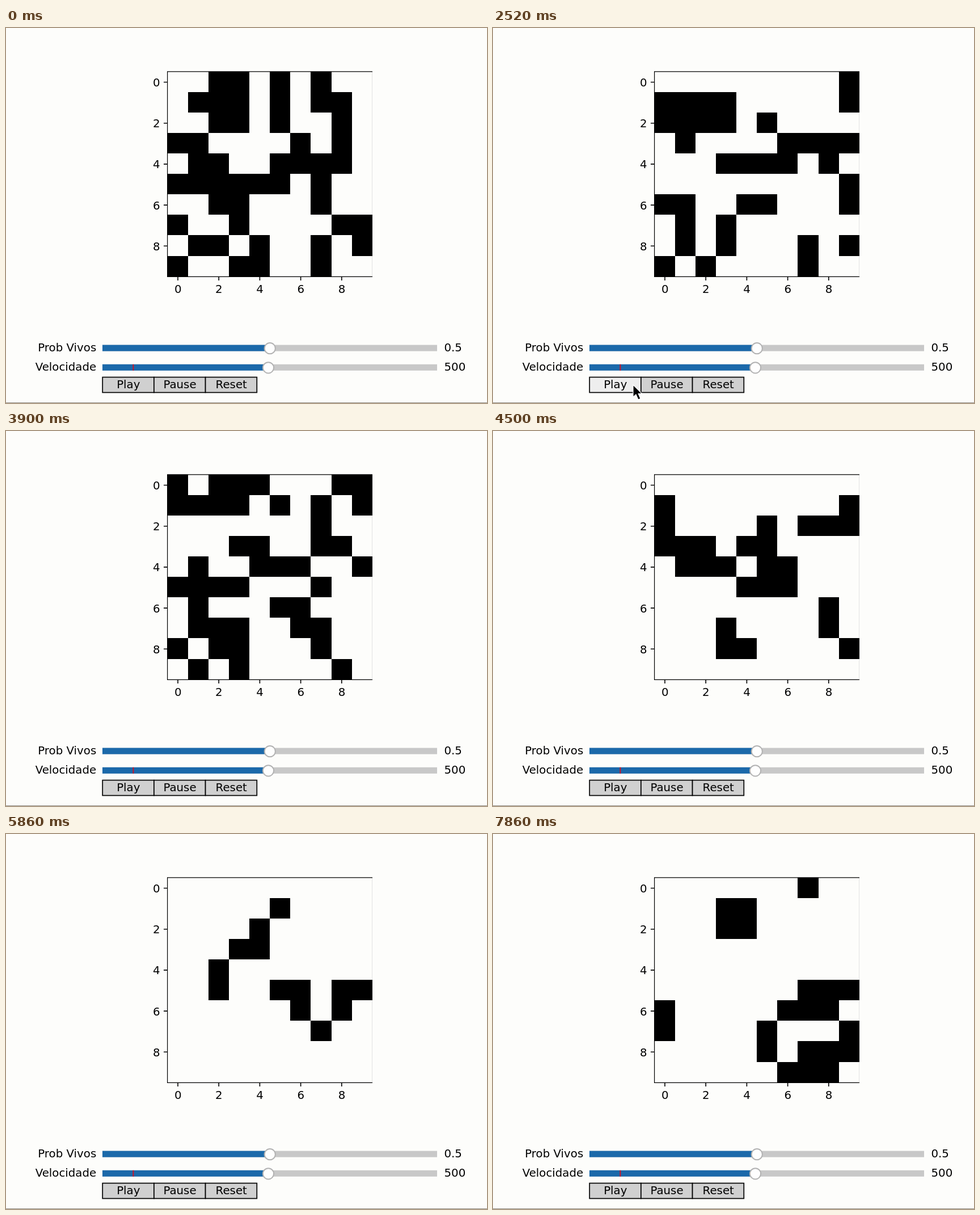
Animation of 848 by 661 pixels, one loop 8000 ms. Source, as an HTML page:

```html
<!DOCTYPE html>
<html lang="pt">
<head>
<meta charset="utf-8">
<title>Jogo da Vida</title>
<style>
  html, body { margin: 0; width: 100%; height: 100%; overflow: hidden; background: #fdfdfb; }
  svg { display: block; width: 848px; height: 661px; }
  text { font: 19.8px "DejaVu Sans", sans-serif; fill: #000; }
  .end { text-anchor: end; }
  .mid { text-anchor: middle; }
  .track { fill: #c8c8c8; }
  .fill { fill: #1b69aa; }
  .handle { fill: #fefefe; stroke: #b2b2b2; stroke-width: 2; }
  .button { fill: #d0d0d0; stroke: #000; stroke-width: 1.7; }
  .button.hover { fill: #eeeeee; }
  .ticks { stroke: #000; stroke-width: 1.6; }
  .spine { fill: none; stroke: #000; stroke-width: 1.2; }
</style>
</head>
<body>
<svg viewBox="0 0 848 661">
  <rect width="848" height="661" fill="#fdfdfb"/>
  <rect y="660" width="848" height="1" fill="#8f8a80"/>
  <path d="M645.5 77V438" stroke="#e2e2e2"/>
  <path id="cells" shape-rendering="crispEdges"/>
  <path class="spine" d="M646 76.9H284.6V438.4H646"/>
  <g id="axes"></g>

  <text class="end" x="159.2" y="570">Prob Vivos</text>
  <rect class="track" x="170" y="558.6" width="590" height="11"/>
  <rect class="fill" x="170" y="558.6" width="295" height="11"/>
  <circle class="handle" cx="465.3" cy="564.7" r="9.6"/>
  <text x="772.5" y="570">0.5</text>

  <text class="end" x="159.2" y="604">Velocidade</text>
  <rect class="track" x="170" y="592.8" width="590" height="11"/>
  <rect class="fill" x="170" y="592.8" width="292" height="11"/>
  <rect x="223.4" y="592.8" width="2" height="11" fill="#cc1428"/>
  <circle class="handle" cx="462.5" cy="598.8" r="9.6"/>
  <text x="772.5" y="604">500</text>

  <g id="buttons"></g>
  <path id="cursor" d="M0 0V21.5L5 17L9 26L13 24.3L9.2 15.5H15.5Z" fill="#000" stroke="#fff" stroke-width="1.2"/>
</svg>
<script>
const LOOP = 8000, FIRST_STEP = 1960, STEP = 280, SIZE = 10;
const CELL = 36.1, LEFT = 284.75, TOP = 76.6;
const $ = id => document.getElementById(id);

const seed = [
  "..##.#.#..", ".###.#.##.", "..##.#..#.", "##....#.#.", ".##..####.",
  "######.#..", "..##...#..", "#..#....##", ".##.#..#.#", "#..##..#.."
].map(row => [...row].map(ch => ch === "#" ? 1 : 0));

// One generation of Life on a torus
function evolve(grid) {
  const at = (r, c) => grid[(r + SIZE) % SIZE][(c + SIZE) % SIZE];
  return grid.map((row, r) => row.map((alive, c) => {
    let sum = 0;
    for (let dr = -1; dr < 2; dr++)
      for (let dc = -1; dc < 2; dc++) sum += at(r + dr, c + dc);
    return sum === 3 || (sum === 4 && alive) ? 1 : 0;
  }));
}

const edgeX = c => Math.round(LEFT + CELL * c);
const edgeY = r => Math.round(TOP + CELL * r);

function cellPath(grid) {
  let d = "";
  grid.forEach((row, r) => row.forEach((alive, c) => {
    if (alive) d += `M${edgeX(c)} ${edgeY(r)}H${edgeX(c + 1)}V${edgeY(r + 1)}H${edgeX(c)}Z`;
  }));
  return d;
}

const paths = [];
for (let grid = seed, t = FIRST_STEP - STEP; t < LOOP; t += STEP, grid = evolve(grid))
  paths.push(cellPath(grid));

let axes = "";
for (let n = 0; n < SIZE; n += 2) {
  const x = 303 + CELL * n, y = 95.5 + CELL * n;
  axes += `<path class="ticks" d="M278 ${y}H285M${x} 438V445"/>
    <text class="end" x="271.6" y="${y + 7.4}">${n}</text>
    <text class="mid" x="${x + 0.2}" y="467">${n}</text>`;
}
$("axes").innerHTML = axes;

$("buttons").innerHTML = ["Play", "Pause", "Reset"].map((label, i) => {
  const x = 170.2 + 90.7 * i;
  return `<rect class="button" x="${x}" y="615.5" width="90.7" height="27"/>
    <text class="mid" x="${x + 45.6}" y="634.8">${label}</text>`;
}).join("");
const play = document.querySelector(".button");

// Cursor keys: time, x, y
const keys = [[0, 262, 668], [900, 262, 668], [1400, 247, 629], [2600, 247, 629], [2900, 254, 668], [LOOP, 254, 668]];

function cursorAt(t) {
  const i = keys.findIndex(k => k[0] > t);
  const a = keys[i - 1], b = keys[i];
  const u = (t - a[0]) / (b[0] - a[0]);
  const e = u * u * (3 - 2 * u);
  return [a[1] + (b[1] - a[1]) * e, a[2] + (b[2] - a[2]) * e];
}

let shown = -1;
function draw(t) {
  const gen = Math.max(0, Math.floor((t - FIRST_STEP) / STEP) + 1);
  if (gen !== shown) $("cells").setAttribute("d", paths[shown = gen]);
  const [x, y] = cursorAt(t);
  $("cursor").setAttribute("transform", `translate(${x} ${y})`);
  play.classList.toggle("hover", x < 261 && y < 642);
}

const start = performance.now();
function frame() {
  draw((performance.now() - start) % LOOP);
  requestAnimationFrame(frame);
}
frame();
</script>
</body>
</html>
```
